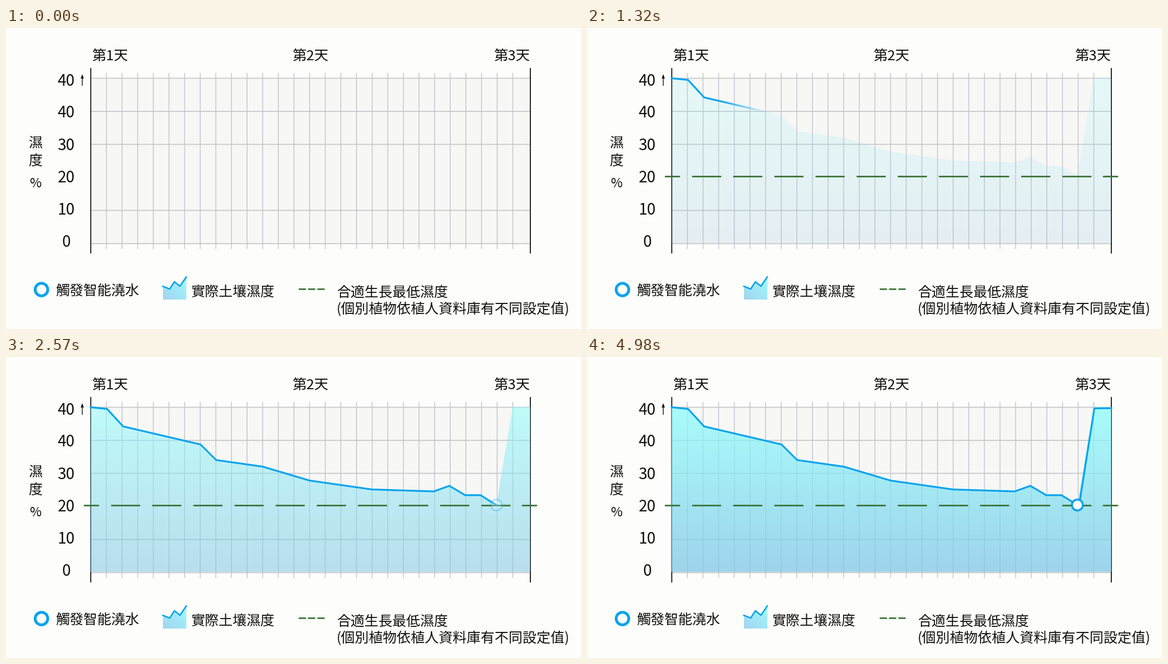
A matplotlib script that plays this animation: 1033 by 542 pixels, repeating every 5010 ms.

```python
import numpy as np
import matplotlib.pyplot as plt
from matplotlib.animation import FuncAnimation
from matplotlib.colors import to_rgb
from matplotlib.patches import Circle, Polygon

W, H, DPI = 1033, 542, 100
PT = 72 / DPI
STEP_MS, FRAMES = 30, 167
BLUE, GREEN, INK, PAPER = "#06a3ee", "#3b7338", "#111111", "#fdfdfb"
LEFT, RIGHT, TOP, BOTTOM = 152.3, 942, 90, 387.5
DIP = (881, 266.5)
BAND = 80  # width of the soft wipe edge

FALL = [(152, 90.5), (181.5, 93.5), (210.5, 125), (349.5, 157.5),
        (377.5, 185.5), (461.5, 197.5), (545.5, 222.5), (657.5, 238.5),
        (768.5, 242), (796.5, 232), (825, 248.8), (852.5, 248.8), DIP]
RISE = [(884.5, 264.5), (911.5, 92.5), (942, 92.2)]

plt.rcParams["font.family"] = "Noto Sans CJK JP"
fig = plt.figure(figsize=(W / DPI, H / DPI), dpi=DPI, facecolor=PAPER)
ax = fig.add_axes([0, 0, 1, 1])


def text(x, baseline, label, size=25, ha="left"):
    ax.text(x, baseline, label, fontsize=size * PT, color=INK, ha=ha,
            va="baseline", zorder=8)


def line(points, color, width, zorder=2, cap="butt"):
    ax.plot(*zip(*points), color=color, lw=width * PT, zorder=zorder,
            solid_capstyle=cap, solid_joinstyle="round", snap=False)


def gradient(outline, start, end, zorder, slant=0):
    """Fill an outline from top to bottom; slant turns it to the left."""
    (x0, y0), (x1, y1) = np.min(outline, 0), np.max(outline, 0)
    v, u = np.mgrid[0:1:64j, 0:1:64j]
    mix = (v + slant * (1 - u)) / (1 + slant)
    start, end = np.array(start) / 255, np.array(end) / 255
    img = ax.imshow(start + (end - start) * mix[..., None],
                    extent=(x0, x1, y1, y0), interpolation="bilinear",
                    aspect="auto", zorder=zorder)
    img.set_clip_path(Polygon(outline, transform=ax.transData))
    return img


def ring(center, radius, width, zorder):
    return ax.add_patch(Circle(center, radius, fc="#fdfefe", ec=BLUE,
                               lw=width * PT, zorder=zorder))


class WipedStroke:
    """Antialiased stroke whose opacity can vary with x."""

    def __init__(self, segments, width, color, zorder):
        pts = np.array(segments, float).reshape(-1, 2)
        x0, y0 = np.floor(pts.min(0) - 6).astype(int)
        x1, y1 = np.ceil(pts.max(0) + 6).astype(int)
        self.x = np.arange(x0, x1) + 0.5
        gx, gy = np.meshgrid(self.x, np.arange(y0, y1) + 0.5)
        dist = np.full(gx.shape, np.inf)
        for (px, py), (qx, qy) in segments:
            dx, dy = qx - px, qy - py
            u = ((gx - px) * dx + (gy - py) * dy) / (dx * dx + dy * dy)
            u = np.clip(u, 0, 1)
            dist = np.minimum(dist, np.hypot(gx - px - u * dx,
                                             gy - py - u * dy))
        self.cover = np.clip(width / 2 + 0.5 - dist, 0, 1)
        self.rgba = np.zeros(gx.shape + (4,))
        self.rgba[..., :3] = to_rgb(color)
        self.img = ax.imshow(self.rgba, extent=(x0, x1, y1, y0),
                             interpolation="nearest", aspect="auto",
                             zorder=zorder)

    def wipe(self, begin, end, band, progress):
        lead = begin + (end + band - begin) * progress
        opacity = np.clip((lead - self.x) / band, 0, 1)
        self.rgba[..., 3] = self.cover * opacity
        self.img.set_data(self.rgba)


def progress(t, start, end):
    return min(max((t - start) / (end - start), 0), 1)


# Plot frame and grid
ax.add_patch(Polygon([(LEFT, TOP), (RIGHT, TOP), (RIGHT, BOTTOM),
                      (LEFT, BOTTOM)], fc="#f7f7f6", ec="none", zorder=1))
for k in range(1, 28):
    x = LEFT + 28.08 * k
    line([(x, 81), (x, 398)], "#c9c9cf", 1.6)
for y in (90.5, 150.2, 209.5, 328.5, 388.3):
    line([(LEFT, y), (RIGHT, y)], "#c5c5c9", 1.7)
for x in (LEFT, RIGHT):
    line([(x, 72), (x, 406)], INK, 1.8, zorder=2.5)

# Axis labels
for x, label in ((154, "第1天"), (514, "第2天"), (875.8, "第3天")):
    text(x, 58.5, label, 25.5)
for baseline, label in ((104, "40"), (161, "40"), (220, "30"),
                        (278, "20"), (336, "10"), (393.5, "0")):
    text(108, baseline, label, 28, "center")
text(53, 215.5, "濕", ha="center")
text(53, 246.5, "度", ha="center")
text(53, 287, "%", 23, "center")
line([(137, 88), (137, 104)], INK, 1.4)
ax.add_patch(Polygon([(137, 83), (139.8, 91), (134.2, 91)], fc=INK,
                     ec="none", zorder=3))

# Legend
ring((63.7, 471), 11.3, 5, 3)
text(89.3, 481, "觸發智能澆水")
mini = [(281.5, 465), (294, 470), (302.5, 457), (312.5, 465), (324, 448)]
gradient(mini + [(324, 489), (281.5, 489)], (160, 250, 253),
         (163, 212, 240), 2, slant=1)
line(mini, BLUE, 2.6, zorder=3, cap="round")
text(332.5, 483, "實際土壤濕度")
for x in (527, 543.5, 560.5):
    line([(x, 470.3), (x + 11, 470.3)], GREEN, 2.8, cap="round")
text(594, 483.7, "合適生長最低濕度")
text(593.5, 514, "(個別植物依植人資料庫有不同設定值)", 25.1)

# Animated parts
area = gradient(FALL + [(910, TOP), (RIGHT, TOP), (RIGHT, BOTTOM),
                        (LEFT - 1, BOTTOM)],
                (137, 254, 253), (125, 199, 232), 3)
dash_spans = ([(141, 166)] + [(190 + 73.9 * k, 240 + 73.9 * k)
                              for k in range(10)] + [(928, 953)])
dashes = WipedStroke([((a, 267.5), (b, 267.5)) for a, b in dash_spans],
                     2.8, GREEN, 5)
falling = WipedStroke(list(zip(FALL, FALL[1:])), 3.2, BLUE, 6)
rising = WipedStroke(list(zip(RISE, RISE[1:])), 3.2, BLUE, 6)
marker = ring(DIP, 9.8, 3.6, 7)

ax.set(xlim=(0, W), ylim=(H, 0))
ax.axis("off")


def draw(i):
    t = i * STEP_MS
    dashes.wipe(138, 956, BAND, progress(t, 0, 750))
    area.set_alpha(0.72 * progress(t, 750, 3330))
    falling.wipe(148, 883, BAND, progress(t, 1000, 2500))
    marker.set_alpha(progress(t, 2500, 2700))
    rising.wipe(882, 944, 9, progress(t, 2720, 3330))
    return dashes.img, area, falling.img, rising.img, marker


anim = FuncAnimation(fig, draw, frames=FRAMES, interval=STEP_MS, repeat=True,
                     repeat_delay=0)
plt.show()
```
